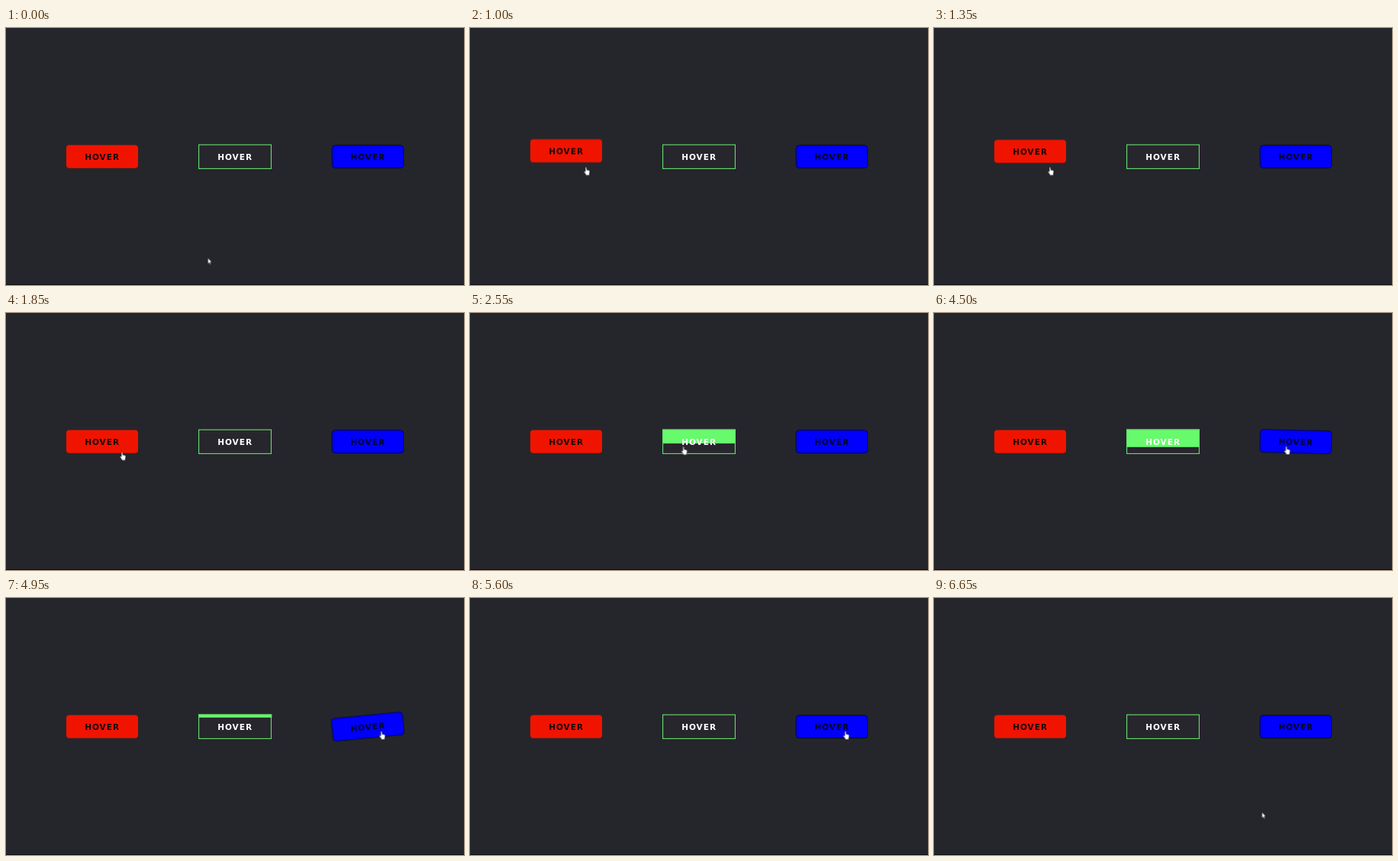
Recreate the animation shown at these times as an HTML page. Size 600 by 337 pixels, loop 6700 ms.

```html
<!DOCTYPE html>
<html lang="en">
<head>
<meta charset="utf-8">
<title>Hover buttons</title>
<style>
  html, body { margin: 0; width: 100%; height: 100%; overflow: hidden; background: #25262b; }
  svg { display: block; width: 100vw; height: 100vh; }
  text {
    font: bold 10.5px "DejaVu Sans", sans-serif;
    letter-spacing: 1px;
  }

  .lift, .fill, .wobble, .cursor, .arrow, .hand { animation: 6.7s infinite; }
  .lift { animation-name: lift; }
  .fill { animation-name: fill; transform-origin: 300px 152.5px; }
  .wobble { animation-name: wobble; transform-origin: 474px 168.75px; }
  .cursor { animation-name: travel; animation-timing-function: cubic-bezier(.42, 0, .58, 1); }
  .cursor path { stroke: #15161a; stroke-width: .6; fill: #fff; }
  .arrow, .hand { animation-timing-function: step-end; }
  .arrow { animation-name: arrow; }
  .hand { animation-name: hand; }

  @keyframes lift {
    0%, 11.27%, 26.19%, 100% { transform: translateY(0); }
    18.73% { transform: translateY(-9.5px); }
  }
  @keyframes fill {
    0%, 32.15%, 81.64%, 100% { transform: scaleY(0); }
    50.06%, 63.73% { transform: scaleY(1); }
  }
  @keyframes wobble {
    0%, 66.57%, 81.49%, 100% { transform: rotate(0deg); }
    71.54% { transform: rotate(10deg); }
    76.52% { transform: rotate(-10deg); }
  }
  @keyframes travel {
    0%, .4% { transform: translate(264.5px, 301.5px); }
    10.6%, 27.9% { transform: translate(152px, 182.4px); }
    32.84%, 59.25% { transform: translate(279.6px, 175.2px); }
    70%, 90% { transform: translate(491.8px, 174.8px); }
    99.25%, 100% { transform: translate(429.6px, 280.8px); }
  }
  @keyframes arrow {
    0%, 29.1%, 63.3%, 91.7%, 100% { opacity: 1; }
    10.4%, 31.3%, 66% { opacity: 0; }
  }
  @keyframes hand {
    0%, 29.1%, 63.3%, 91.7%, 100% { opacity: 0; }
    10.4%, 31.3%, 66% { opacity: 1; }
  }
</style>
</head>
<body>
<svg viewBox="0 0 600 337" preserveAspectRatio="none">
  <rect width="600" height="337" fill="#25262b"/>
  <rect y="336" width="600" height="1" fill="#0c0c0e"/>

  <g class="lift">
    <rect x="79" y="153.4" width="94" height="30.4" rx="4" fill="#f01400"/>
    <text x="103.2" y="172.8" fill="#1a0505">HOVER</text>
  </g>

  <g>
    <rect x="252" y="152.5" width="96" height="32.5" fill="#28262d"/>
    <rect class="fill" x="252" y="152.5" width="96" height="32.5" fill="#67fa6d"/>
    <rect x="252.6" y="153.1" width="94.8" height="31.3" fill="none" stroke="#67e06e" stroke-width="1.1"/>
    <text x="277.2" y="172.8" fill="#fff">HOVER</text>
  </g>

  <g class="wobble">
    <rect x="427.2" y="153.7" width="93.6" height="30" rx="4" fill="#0000fc" stroke="#05051c" stroke-width=".8"/>
    <text x="451.2" y="172.8" fill="#030322">HOVER</text>
  </g>

  <g class="cursor">
    <path class="arrow" d="M0 0V7.8L1.7 6.2L2.9 9L4.1 8.5L2.9 5.7H5.2Z"/>
    <path class="hand" d="M-.9 .8Q-.9 -.1 0 -.1Q.9 -.1 .9 .8V3.6L4 4.3Q5.1 4.7 5 6L4.4 9V10.8H-.4V9.4L-2.9 6.2Q-3 5 -2 5.2L-.9 6.2Z"/>
  </g>
</svg>
</body>
</html>
```
